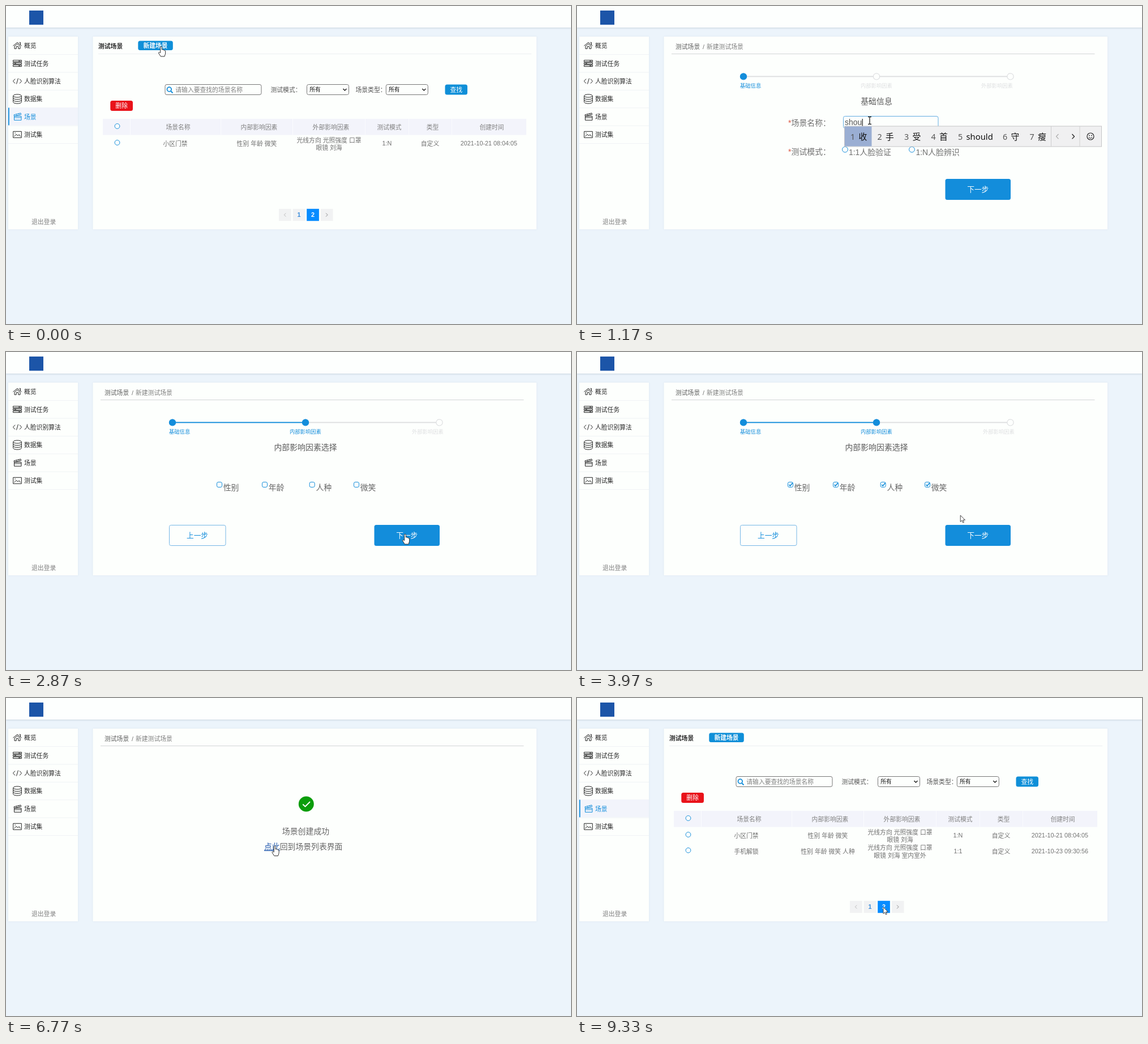
These frames come from a looping animation (998x561 px, 9.41 s). An HTML page:

```html
<!DOCTYPE html>
<html lang="zh-CN">
<head>
<meta charset="utf-8">
<style>
  html, body { margin: 0; width: 100%; height: 100%; overflow: hidden; background: #ecf4fb; }
  svg { display: block; font-family: 'Liberation Sans', 'Noto Sans CJK SC', 'Noto Sans CJK', sans-serif; }
  .card { fill: #fdfffd; filter: drop-shadow(0 0 1.5px #b9c9da55); }
  .ime { font-family: 'Noto Sans', 'Noto Sans CJK SC', 'Noto Sans CJK', sans-serif; }
</style>
</head>
<body>
<svg width="998" height="561" viewBox="0 0 998 561">
  <g id="screen"></g>
  <g id="pointer"></g>
</svg>
<script>
const LOOP = 9410;
const BLUE = '#138ddb', GREY = '#707070', PALE = '#dedfe1', BACK = '#ecf4fb';
const SMALL = 10.8, LARGE = 13.9;

// Drawing helpers; text is placed by its vertical centre.
const text = (x, cy, s, { size = SMALL, fill = GREY, anchor = 'start', more = '' } = {}) =>
  `<text x="${x}" y="${cy + size * .37}" font-size="${size}" fill="${fill}" text-anchor="${anchor}" ${more}>${s}</text>`;
const mid = (x, cy, s, style) => text(x, cy, s, { anchor: 'middle', ...style });
const rect = (x, y, w, h, fill, more = '') =>
  `<rect x="${x}" y="${y}" width="${w}" height="${h}" fill="${fill}" ${more}/>`;
const outline = (x, y, w, h, stroke, r = 3) => rect(x, y, w, h, '#fdfffd', `stroke="${stroke}" rx="${r}"`);
const path = (d, stroke = '#333', width = 1, fill = 'none') =>
  `<path d="${d}" fill="${fill}" stroke="${stroke}" stroke-width="${width}" stroke-linejoin="round"/>`;
const circle = (x, y, r, fill, stroke = 'none', width = 1) =>
  `<circle cx="${x}" cy="${y}" r="${r}" fill="${fill}" stroke="${stroke}" stroke-width="${width}"/>`;
const at = (x, y, content) => `<g transform="translate(${x} ${y})">${content}</g>`;
const button = (x, y, w, h, label, fill = BLUE, size = SMALL, more = '') =>
  rect(x, y, w, h, fill, 'rx="3.5"') + mid(x + w / 2, y + h / 2 + .3, label, { size, fill: '#fff', more });
const last = (list, t) => list.filter(item => item[0] <= t).pop();

// Sidebar icons, centred on 0,0.
const MENU = [
  ['概览', 'M-7.5 .5L0 -5.5L7.5 .5M-5 1V5.5H-1.8V1.5H1.8V5.5H5V1L0 -3ZM3.5 -5.5H5.5V-1.5'],
  ['测试任务', 'M-7.5 -5.5H7.5V-2.8H-7.5ZM-7.5 -1.3H7.5V1.3H-7.5ZM-7.5 2.8H7.5V5.5H-7.5ZM2 -4.2H5.5M-5.5 0H-2M2 4.2H5.5'],
  ['人脸识别算法', 'M-4 -4L-7.5 0L-4 4M4 -4L7.5 0L4 4M1.5 -5L-1.5 5'],
  ['数据集', 'M-7.3 -5.5A7.3 2.6 0 0 1 7.3 -5.5A7.3 2.6 0 0 1 -7.3 -5.5V5.5A7.3 2.6 0 0 0 7.3 5.5V-5.5M-7.3 -1.8A7.3 2.6 0 0 0 7.3 -1.8M-7.3 1.8A7.3 2.6 0 0 0 7.3 1.8'],
  ['场景', 'M-5.5 -1H7V6H-5.5ZM-5.5 -1L-6 -3.5L6 -6.5L6.7 -4L-5.5 -1M-2 -4.5L0 -2.5M2 -5.5L4 -3.5M-5.5 1.5H7'],
  ['测试集', 'M-7.3 -5.5H7.3V5.5H-7.3ZM-5.5 3.5L-2 -.5L1 2L3 0L5.5 3.5M-4.5 -2.8H-3'],
];

function frameParts(listOpen) {
  let out = rect(0, 0, 998, 561, BACK) +
    rect(0, 0, 998, 38, '#fdfffe', 'style="filter:drop-shadow(0 1px 1.5px #a9b7c688)"') +
    rect(41, 8, 25, 25, '#1c55a8') +
    rect(4, 54, 123, 340, '', 'class="card"') + rect(153.5, 54, 783.5, 340, '', 'class="card"');
  MENU.forEach(([label, icon], i) => {
    const y = 69.8 + i * 31.4, active = listOpen && i === 4;
    if (active) out += rect(4, 179.5, 123, 31, '#f2f4fb') + rect(4, 179.5, 1.8, 31, BLUE);
    out += at(20, y, path(icon, active ? BLUE : '#222')) +
      text(32, y + .4, label, { fill: active ? BLUE : '#2a2a2a' }) + rect(4, y + 15.3, 123, 1, '#f0f3f5');
  });
  return out + text(45, 380.8, '退出登录', { fill: '#808080' });
}

const COLUMNS = [[304, '场景名称'], [447, '内部影响因素'], [574, '外部影响因素'], [677, '测试模式'], [753.5, '类型'], [858, '创建时间']];
const ROWS = {
  1: [
    ['考勤打卡', '性别 年龄', '光线方向 光照强度', '眼镜', '1:N', '2021-10-19 10:12:26'],
    ['车站进站', '性别 年龄 人种', '光线方向 口罩', '眼镜 刘海', '1:1', '2021-10-19 14:35:08'],
    ['刷脸支付', '年龄 微笑', '光照强度 口罩', '眼镜 室内室外', '1:1', '2021-10-20 09:21:47'],
    ['校园门禁', '性别 微笑', '光线方向 光照强度', '口罩 刘海', '1:N', '2021-10-20 16:40:13'],
  ],
  2: [
    ['小区门禁', '性别 年龄 微笑', '光线方向 光照强度 口罩', '眼镜 刘海', '1:N', '2021-10-21 08:04:05'],
    ['手机解锁', '性别 年龄 微笑 人种', '光线方向 光照强度 口罩', '眼镜 刘海 室内室外', '1:1', '2021-10-23 09:30:56'],
  ],
};

const radio = (x, y, r, on) => circle(x, y, r, '#fdfffd', BLUE) + (on ? circle(x, y, r - 2.2, BLUE) : '');
const select = (x) => outline(x, 138.5, 74, 18, '#777') + text(x + 4.7, 147, '所有', { size: 9.8, fill: '#111' }) +
  path(`M${x + 64} 146l3 3 3-3`, '#222', 1.5);

function listScreen(page, rowCount) {
  let out = text(163, 71, '测试场景', { fill: '#2a2a2a', more: 'font-weight="bold"' }) +
    button(233.3, 61.5, 61.5, 16.5, '新建场景', '#0f8fd8', SMALL, 'font-weight="bold"') +
    rect(163, 84, 765, 1, '#eceff1') +
    outline(281, 138.5, 170, 18, '#777') + circle(288.3, 147, 3.8, 'none', BLUE, 1.8) +
    path('M291 150l3.5 3.5', BLUE, 2) + text(299.3, 147.7, '请输入要查找的场景名称', { fill: '#808080' }) +
    text(467.5, 148.3, '测试模式：', { fill: '#555' }) + select(531.5) +
    text(617.5, 148.3, '场景类型：', { fill: '#555' }) + select(671.3) +
    button(775.5, 138.5, 39.5, 18, '查找', '#0f8fd8') + button(184.3, 167, 39.7, 18, '删除', '#e9131a') +
    rect(171, 199, 748, 28.5, '#f3f4fb') + radio(196.5, 212, 4.4);
  for (const x of [219, 379, 506, 634, 711, 787]) out += rect(x, 199, 1, 28.5, '#fafbfe');
  for (const [x, label] of COLUMNS) out += mid(x, 214, label, { fill: '#808080' });
  ROWS[page].slice(0, rowCount).forEach(([name, inner, outer1, outer2, mode, time], i) => {
    const y = 243.3 + i * 27.7;
    out += radio(196.5, y - 2.3, 4.4) + mid(299, y, name) + mid(443, y, inner) + mid(570.5, y - 6.7, outer1) +
      mid(570.5, y + 7, outer2) + mid(673, y - .8, mode) + mid(749, y, '自定义') + mid(853, y - .8, time);
  });
  for (let i = 0; i < 4; i++) {
    const x = 482 + i * 24.6, active = i === page;
    out += rect(x, 357.8, 21.7, 21.4, active ? '#078cff' : '#f1f2f3');
    out += i % 3 ? mid(x + 10.8, 368.5, i, { fill: active ? '#fff' : '#3a8ddb', more: 'font-weight="bold"' })
      : path(i ? `M${x + 9.3} 365.5l3 3-3 3` : `M${x + 12.3} 365.5l-3 3 3 3`, i ? '#888' : '#b8b8b8');
  }
  return out;
}

const breadcrumb = () => text(174, 72.2, '测试场景', { fill: '#606060' }) + text(222, 72, '/') +
  text(229, 72.2, '新建测试场景', { fill: '#808080' }) + rect(167, 84, 747.5, 1, '#d3d5d6');

function stepper(step, title) {
  const tone = n => step >= n ? BLUE : PALE;
  const dots = [294, 529, 765.5], labels = ['基础信息', '内部影响因素', '外部影响因素'];
  const labelX = [288, 501, step > 1 ? 717 : 714];
  let out = rect(299, 123.4, 225, 1.9, tone(2)) + rect(534, 123.4, 226, 1.9, tone(3));
  dots.forEach((x, i) => {
    out += circle(x, 124.4, 5.6, step > i ? BLUE : '#fdfffd', tone(i + 1), 1.2) +
      text(labelX[i], 141, labels[i], { size: 9.3, fill: tone(i + 1) });
  });
  return out + mid(529, 168, title, { size: LARGE, fill: '#5c5c5c' }) +
    button(650.5, 305, 115.5, 37, step === 3 ? '创建' : '下一步', BLUE, 12.7) +
    (step > 1 ? outline(288.5, 305.5, 99.5, 36, '#76b7e6') + mid(338, 323.8, '上一步', { size: 12.7, fill: BLUE }) : '');
}

// Pinyin typing: start time, composed text, candidates.
const TYPING = [
  [0, '', ''],
  [880, 's', '是 说 上 岁 所 三 算'],
  [960, 'sh', '是 上 说 时 事 谁 少'],
  [1060, 'sho', '收 手 受 首 short 守 瘦'],
  [1140, 'shou', '收 手 受 首 should 守 瘦'],
  [1290, "shou'j", '手机 收集 手脚 手巾 首届'],
  [1370, "shou'ji", '手机 收集 首级 手记 收'],
  [1460, "shou'ji'j", '手机 收集 收 手'],
  [1520, "shou'ji'ji", '手机 收集 收 手'],
  [1580, "shou'ji'jie", '手机 收集 收 手'],
  [1650, "shou'ji'jie's", '手机解锁 手机 收集 收'],
  [1710, "shou'ji'jie'su", '手机解锁 手机 收集 收'],
  [1770, "shou'ji'jie'suo", '手机解锁 手机 收集 收'],
  [1880, '手机解锁', ''],
];

function candidateBar(words) {
  let x = 473, items = '';
  words.split(' ').forEach((word, i) => {
    const width = word.length * (/[a-z]/.test(word) ? 7.75 : 15) + 32.5;
    if (!i) items += rect(x, 212.5, width, 35, '#9aaed3');
    items += text(x + 10, 230.3, i + 1, { size: 14.3, fill: '#555' }) + text(x + 24.5, 230.3, word, { size: 14.8, fill: '#111' });
    x += width;
  });
  return `<g class="ime">${rect(472.5, 212, x - 383, 36, '#f0f0f1', 'stroke="#c5c5c7"')}${items}</g>` +
    rect(x, 212, 1, 36, '#cfcfcf') + rect(x + 50.5, 212, 1, 36, '#cfcfcf') +
    path(`M${x + 13.5} 226l-4 4.2 4 4.2`, '#aaa', 1.2) + path(`M${x + 37.5} 226l4 4.2-4 4.2`, '#222', 1.3) +
    at(x + 70, 230, circle(0, 0, 6, 'none', '#222', 1.2) + circle(-2.1, -1.6, .9, '#222') +
      circle(2.1, -1.6, .9, '#222') + path('M-3 1.5Q0 5 3 1.5', '#222', 1.1));
}

function basicStep(t) {
  const [, typed, words] = last(TYPING, t);
  const label = (y, s) => text(373, y, '*', { size: LARGE, fill: '#dd5a45' }) + text(378.5, y, s, { size: LARGE });
  const caret = words ? `<tspan fill="#222" font-size="15" dx="-1">|</tspan>` : '';
  return stepper(1, '基础信息') + label(206, '场景名称：') + label(256.5, '测试模式：') +
    outline(470.5, 194.5, 167.5, 21, t > 680 ? '#62ace2' : '#9a9a9a') +
    text(473, 205.3, typed + caret, { size: LARGE, fill: '#555' }) +
    radio(473.5, 253.2, 4.9, t > 2400) + text(480, 258, '1:1人脸验证', { size: LARGE }) +
    radio(591.5, 253.2, 4.9) + text(598.5, 258, '1:N人脸辨识', { size: LARGE }) +
    (words ? candidateBar(words) : '');
}

// Check boxes: x, y, label, time of the click.
const INNER = [[377, 234, '性别', 3220], [457, 234, '年龄', 3400], [540.7, 234, '人种', 3580], [619, 234, '微笑', 3760]];
const OUTER = [
  [382, 224, '刘海', 4530], [482.5, 224, '眼镜', 4790], [584.8, 224, '口罩', 5080],
  [382, 254, '光线方向', 5640], [482.5, 254, '光照强度', 5460], [584, 254, '室内室外', 5270],
];
const checkBoxes = (boxes, t) => boxes.map(([x, y, label, clicked]) =>
  outline(x - 4.5, y - 4.5, 9, 9, BLUE, 2.6) +
  (t >= clicked ? path(`M${x - 2.5} ${y}l2 2.3 4.4-5.6`, BLUE, 1.7) : '') +
  text(x + 6.7, y + 4.8, label, { size: LARGE, fill: '#666' })).join('');

const doneScreen = () => circle(530.3, 187, 13.5, '#0b9d0b') + path('M524.3 187.5l4.2 4 8.5-8.5', '#fff', 1.8) +
  mid(529.5, 235, '场景创建成功', { size: LARGE, fill: '#666' }) +
  text(456, 262.3, '<tspan fill="#1d55ac" text-decoration="underline">点此</tspan>回到场景列表界面', { size: 13.85, fill: '#666' });

function screenAt(t) {
  if (t < 130) return frameParts(true) + listScreen(2, 1);
  if (t >= 7000) return frameParts(true) + listScreen(t < 7700 ? 1 : 2);
  const base = frameParts(false) + breadcrumb();
  if (t < 2860) return base + basicStep(t);
  if (t < 4150) return base + stepper(2, '内部影响因素选择') + checkBoxes(INNER, t);
  if (t < 5980) return base + stepper(3, '外部影响因素选择') + checkBoxes(OUTER, t);
  return base + doneScreen();
}

const POINTERS = {
  arrow: path('M0 0V11.5L2.7 9L4.4 13L6.3 12.2L4.6 8.3H8.3Z', '#444', 1, '#fff'),
  hand: path('M-1.3 1.2Q0 -.8 1.3 1.2V6Q3 5 3.8 6.6Q5.4 6 6 7.6Q7.5 7.3 7.6 9V13L6 18H-.7L-4.5 12Q-4.5 9.5 -1.3 11.5Z', '#333', 1, '#fff'),
  beam: path('M-3 -6.5H-.8L0 -6L.8 -6.5H3M0 -6V6M-3 6.5H-.8L0 6L.8 6.5H3', '#222', 1.3),
};

// Pointer stops: time, x, y, shape from then on.
const TRACK = [
  [0, 274, 71, 'hand'], [150, 274, 71, 'arrow'], [640, 517, 202, 'beam'], [1900, 517, 202, 'beam'],
  [2060, 516.5, 201, 'beam'], [2130, 515, 204, 'arrow'], [2350, 473, 253, 'arrow'], [2450, 473, 253, 'arrow'],
  [2780, 705, 321, 'hand'], [2900, 705, 321, 'arrow'], [3180, 377, 234, 'arrow'], [3230, 377, 234, 'arrow'],
  [3380, 457, 234, 'arrow'], [3420, 457, 234, 'arrow'], [3560, 541, 234, 'arrow'], [3600, 541, 234, 'arrow'],
  [3740, 619, 234, 'arrow'], [3780, 619, 234, 'arrow'], [3960, 677, 287.5, 'arrow'], [4100, 690, 318, 'hand'],
  [4180, 690, 318, 'arrow'], [4500, 382, 224, 'arrow'], [4560, 382, 224, 'arrow'], [4760, 482, 224, 'arrow'],
  [4800, 482, 224, 'arrow'], [4890, 508, 229.5, 'arrow'], [5050, 585, 224, 'arrow'], [5090, 585, 224, 'arrow'],
  [5240, 584, 254, 'arrow'], [5290, 584, 254, 'arrow'], [5430, 482, 254, 'arrow'], [5480, 482, 254, 'arrow'],
  [5610, 382, 254, 'arrow'], [5660, 382, 254, 'arrow'], [5900, 732, 311, 'hand'], [5980, 732, 311, 'arrow'],
  [6500, 474.5, 260.5, 'hand'], [7000, 474.5, 260.5, 'arrow'], [7560, 541, 369, 'arrow'], [LOOP, 541, 369, 'arrow'],
];

function pointerAt(t) {
  const i = TRACK.findIndex(stop => stop[0] > t);
  const [t0, x0, y0, shape] = TRACK[i - 1], [t1, x1, y1] = TRACK[i];
  const p = (t - t0) / (t1 - t0), k = p * p * (3 - 2 * p);
  return at(x0 + (x1 - x0) * k, y0 + (y1 - y0) * k, POINTERS[shape]);
}

const screenLayer = document.getElementById('screen'), pointerLayer = document.getElementById('pointer');
const start = performance.now();
let shown = '';
function draw() {
  const t = (performance.now() - start) % LOOP;
  const next = screenAt(t);
  if (next !== shown) screenLayer.innerHTML = shown = next;
  pointerLayer.innerHTML = pointerAt(t);
  requestAnimationFrame(draw);
}
draw();
</script>
</body>
</html>
```
